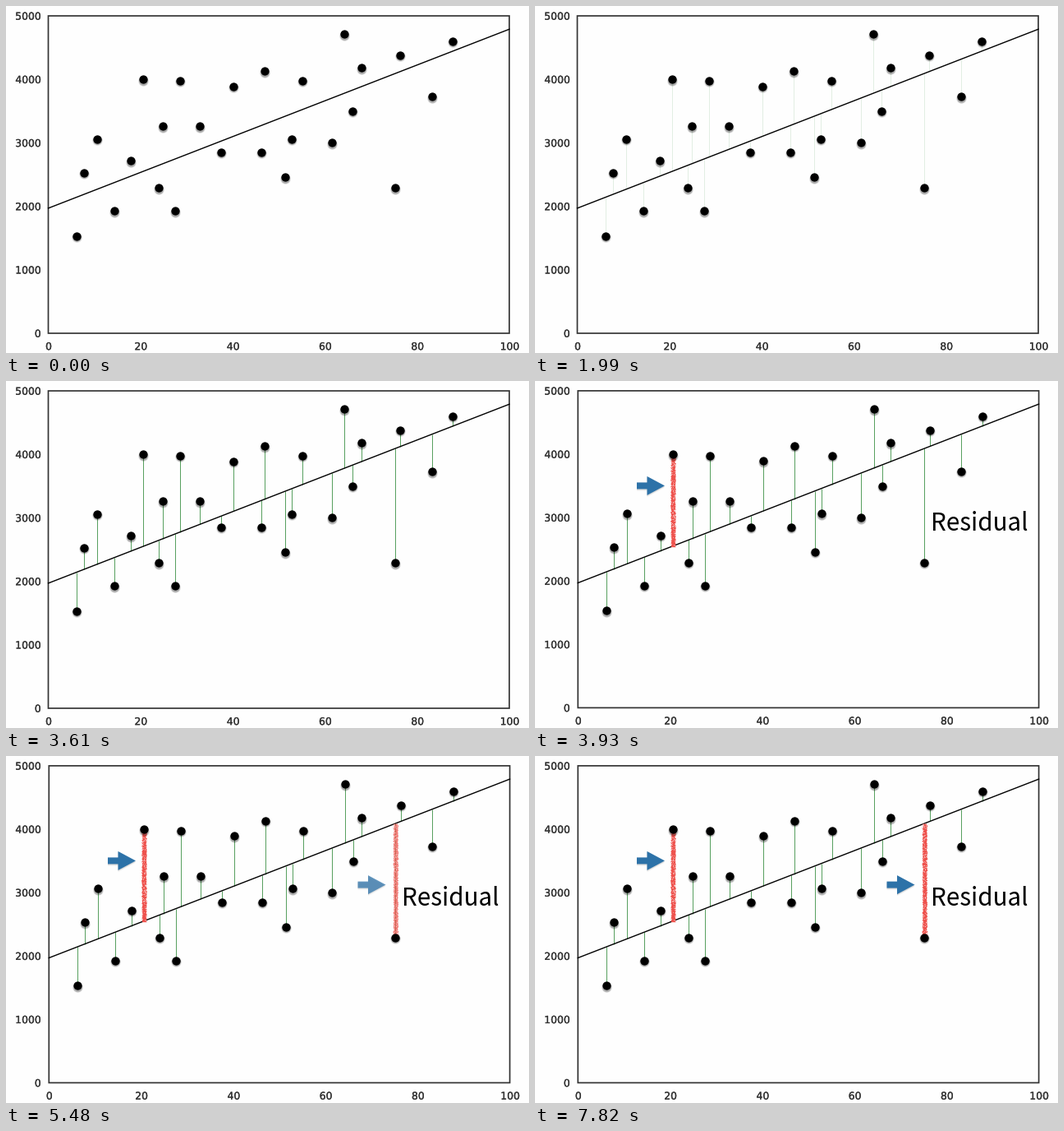
Write a matplotlib script that moves like this. It is 637x422 px and loops after 8060 ms.

```python
import numpy as np
import matplotlib.pyplot as plt
from matplotlib.animation import FuncAnimation
from matplotlib.collections import LineCollection
from matplotlib.patheffects import withStroke

W, H, DPI = 637, 422, 64
PX = 72 / DPI                      # points per pixel
STEP, LOOP = 20, 8060              # ms
BEAT = 130                         # ms between two visible fade steps
CUT = 3930                         # hard cut to the annotated chart

BACK, INK, GREEN, RED, BLUE = "#fefefe", "#333333", "#58a060", "#ee524d", "#2d72a8"

# The plotted data
X = np.array([6.1, 7.7, 10.6, 14.3, 17.9, 20.6, 24, 24.8, 27.6, 28.6, 32.9, 37.5, 40.2,
              46.3, 46.9, 51.4, 52.8, 55.1, 61.5, 64.2, 66, 67.9, 75.2, 76.4, 83.2, 87.8])
Y = 10 * np.array([153, 253, 306, 193, 272, 400, 229, 326, 193, 398, 326, 285, 389,
                   285, 413, 246, 306, 398, 300, 471, 350, 418, 229, 438, 373, 460])

# Plot boxes: left, right, top, bottom
FIRST = (51.5, 613, 12, 398)
SECOND = (52.3, 613.6, 11.9, 397.4)

rng = np.random.default_rng(4)
fig = plt.figure(figsize=(W / DPI, H / DPI), dpi=DPI, facecolor=BACK)


def fit(x):
    return 1970 + 28.2 * x


def place(x, y, box):
    """Data values to stage pixels."""
    left, right, top, bottom = box
    return left + x * (right - left) / 100, bottom - y * (bottom - top) / 5000


def stepped(t, start, steps, power=1):
    """Eased 0-to-1 ramp that moves once per beat."""
    beats = np.clip((t - start) // BEAT + 1, 0, steps)
    return 1 - (1 - beats / steps) ** power


def chart(box):
    """Draw the scatter chart; return its axes and residual lines."""
    left, right, top, bottom = box
    ax = fig.add_axes([0, 0, 1, 1])
    ax.set_xlim(0, W)
    ax.set_ylim(H, 0)
    ax.axis("off")

    ax.add_patch(plt.Rectangle((left, top), right - left, bottom - top, fill=False,
                               ec=INK, lw=1.7 * PX, snap=False, zorder=2))
    font = dict(family="DejaVu Sans", size=12.4 * PX, color=INK,
                path_effects=[withStroke(linewidth=.25 * PX, foreground=INK)])
    for i in range(6):
        x, y = place(20 * i, 1000 * i, box)
        ax.text(42.7, y + 4.7, str(1000 * i), ha="right", **font)
        ax.text(x + .5, bottom + 20.2, str(20 * i), ha="center", **font)

    x, y = place(X, Y, box)
    _, ends = place(X, fit(X), box)
    stems = LineCollection([[(a, b), (a, c)] for a, b, c in zip(x, y, ends)],
                           colors=GREEN, linewidths=PX, zorder=3)
    ax.add_collection(stems)
    span = np.array([0, 100])
    ax.plot(*place(span, fit(span), box), color="black", lw=1.4 * PX, zorder=4)

    for grow in range(3):          # soft shadow
        ax.scatter(x, y + 1.5, s=((10.5 + 1.2 * grow) * PX) ** 2, c="black",
                   alpha=.18 - .055 * grow, lw=0, zorder=6)
    ax.scatter(x, y, s=(10.3 * PX) ** 2, c="black", lw=0, zorder=7)
    return ax, stems


def chalk(ax, k, box):
    """Rough red bar with light specks over the residual of point k."""
    x, y = place(X[k], Y[k], box)
    _, end = place(X[k], fit(X[k]), box)
    top, bottom = sorted((y, end))
    rows = np.arange(top, bottom + 1, .7)
    edge = rng.uniform(-.8, .8, (2, len(rows)))
    bar = ax.fill_betweenx(rows, x - 2.7 + edge[0], x + 2.7 + edge[1],
                           color=RED, lw=0, zorder=5)
    n = int((bottom - top) * 1.6)
    specks = ax.scatter(x + rng.uniform(-3.2, 3.2, n), rng.uniform(top, bottom, n),
                        s=(1.1 * PX) ** 2, c="white", lw=0, zorder=5)
    return [(bar, 1), (specks, .48)]


def arrow(ax, x, y):
    """Block arrow pointing right, with a soft shadow."""
    upper = np.array([(0, -4), (12.5, -4), (12.5, -11.5), (34, 0)])
    shape = np.vstack([upper, upper[-2::-1] * (1, -1)])
    parts = []
    for dy, color, alpha in ((2, "black", .07), (1, "black", .09), (0, BLUE, 1)):
        patch = plt.Polygon(shape + (x, y + dy), fc=color, lw=0, zorder=5)
        ax.add_patch(patch)
        parts.append((patch, alpha))
    return parts


def fade(parts, amount):
    for part, alpha in parts:
        part.set_alpha(alpha * amount)


plain, stems = chart(FIRST)
rule, = plain.plot([0, W], [H - .5, H - .5], color="#404040", lw=PX)

noted, _ = chart(SECOND)
fade(chalk(noted, 5, SECOND) + arrow(noted, 124, 127.4), 1)
late_mark = chalk(noted, 22, SECOND) + arrow(noted, 428.5, 156.6)
noted.text(482.2, 182.5, "Residual", family="Noto Sans CJK JP", size=29.5 * PX,
           color="black", zorder=8)


def update(i):
    t = i * STEP + STEP / 2
    plain.set_visible(t < CUT)
    noted.set_visible(t >= CUT)
    rule.set_alpha(1 - stepped(t, 1570, 5, 2))
    stems.set_alpha(stepped(t, 1870, 6))
    fade(late_mark, stepped(t, 5080, 8, 2))
    return []


anim = FuncAnimation(fig, update, frames=LOOP // STEP, interval=STEP,
                     repeat=True, repeat_delay=0, blit=False)
plt.show()
```
